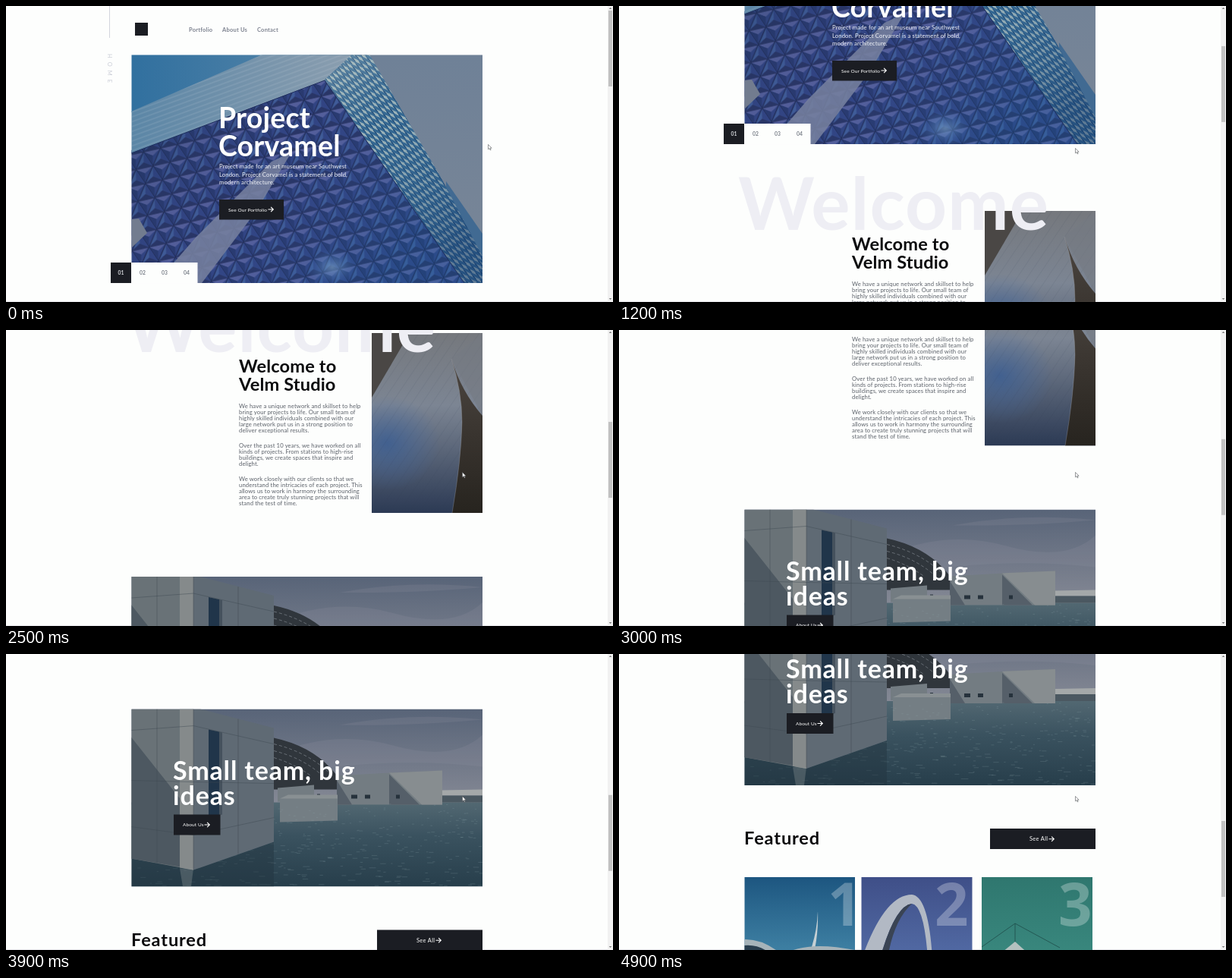
An HTML page for the animation above (5000 ms loop, 800x390 px).

```html
<!DOCTYPE html>
<html lang="en">
<head>
<meta charset="utf-8">
<title>Studio page</title>
<style>
html, body { margin: 0; width: 100%; height: 100%; overflow: hidden; background: #fdfefd; }
svg { display: block; width: 800px; height: 390px; }
text { font-family: Lato, sans-serif; }
.nav { font-weight: 700; font-size: 7.5px; letter-spacing: .22px; fill: #7d828f; }
.home { font-size: 7.5px; letter-spacing: 5px; fill: #c9ccd6; }
.hero { font-weight: 700; font-size: 37.5px; letter-spacing: .2px; fill: #fff; }
.lead, .copy { font-size: 7.7px; letter-spacing: .12px; fill: #f4f6fa; }
.copy { fill: #5b6069; }
.tab { font-weight: 700; font-size: 6.8px; text-anchor: middle; fill: #7b808a; }
.on { fill: #d5d7db; }
.btn { font-size: 6.5px; letter-spacing: .1px; fill: #fff; }
.wide { font-size: 7.5px; letter-spacing: .3px; }
.big { font-weight: 700; font-size: 96px; letter-spacing: 1.1px; fill: #eeeef4; }
.h2 { font-weight: 700; font-size: 23.6px; letter-spacing: .15px; fill: #0b0b0d; }
.feat { letter-spacing: .85px; }
.team { font-weight: 700; font-size: 34px; letter-spacing: .85px; fill: #fff; }
.num { font: 700 78px "Open Sans", sans-serif; fill: #fff; opacity: .28; }
.dark { fill: #1b1d23; }
.arrow { fill: none; stroke: #fff; stroke-width: 1.1; }
</style>
</head>
<body>
<svg viewBox="0 0 800 390">
<defs>
  <linearGradient id="skyL" x2="1"><stop stop-color="#31709f"/><stop offset="1" stop-color="#5a88aa"/></linearGradient>
  <linearGradient id="skyR" x2="0" y2="1"><stop stop-color="#6f8197"/><stop offset="1" stop-color="#798697"/></linearGradient>
  <linearGradient id="roof" x2="1"><stop stop-color="#5b86a6"/><stop offset="1" stop-color="#8b9eaf"/></linearGradient>
  <linearGradient id="shade" x2="1" y2=".5"><stop stop-color="#16304f" stop-opacity=".35"/><stop offset=".5" stop-color="#5a5a9a" stop-opacity=".12"/><stop offset="1" stop-color="#2a62a0" stop-opacity=".3"/></linearGradient>
  <linearGradient id="fall" x2=".5" y2="1"><stop stop-color="#d5dcd4" stop-opacity=".35"/><stop offset=".4" stop-color="#4f80a5" stop-opacity=".08"/><stop offset="1" stop-color="#1c3f70" stop-opacity=".5"/></linearGradient>
  <radialGradient id="glow"><stop stop-color="#7fa6cc" stop-opacity=".6"/><stop offset="1" stop-color="#3a6db5" stop-opacity="0"/></radialGradient>
  <radialGradient id="blue"><stop stop-color="#3a5e94" stop-opacity=".8"/><stop offset="1" stop-color="#4569a0" stop-opacity="0"/></radialGradient>
  <linearGradient id="steel" x2="0" y2="1"><stop stop-color="#75787d"/><stop offset=".4" stop-color="#7c8593"/><stop offset="1" stop-color="#2c3a54"/></linearGradient>
  <linearGradient id="fin" x2="0" y2="1"><stop stop-color="#4c4641"/><stop offset=".5" stop-color="#39342f"/><stop offset="1" stop-color="#27241f"/></linearGradient>
  <linearGradient id="dusk" x2="0" y2="1"><stop stop-color="#586478"/><stop offset="1" stop-color="#858995"/></linearGradient>
  <linearGradient id="water" x2="0" y2="1"><stop stop-color="#526872"/><stop offset=".4" stop-color="#3a525f"/><stop offset="1" stop-color="#273e4b"/></linearGradient>
  <linearGradient id="c1" x2="0" y2="1"><stop stop-color="#1d5680"/><stop offset="1" stop-color="#4386a8"/></linearGradient>
  <linearGradient id="c2" x2="0" y2="1"><stop stop-color="#3f4f88"/><stop offset="1" stop-color="#536ca6"/></linearGradient>
  <linearGradient id="c3" x2="0" y2="1"><stop stop-color="#2f776f"/><stop offset="1" stop-color="#3a897f"/></linearGradient>
  <pattern id="tiles" width="20" height="20" patternUnits="userSpaceOnUse" patternTransform="matrix(1.12 -.25 .62 .92 0 0)">
    <path fill="#2c4180" d="M0 0H20V20H0Z"/>
    <path fill="#535f9b" d="M0 0H20L7 7Z"/>
    <path fill="#22356a" d="M0 0V20L7 7Z"/>
    <path fill="#3c5c98" d="M20 0L0 20 13 13Z"/>
    <path fill="#22305f" d="M20 20H0L13 13Z"/>
    <path stroke="#17234a" fill="none" d="M0 0H20L0 20Z"/>
  </pattern>
  <pattern id="slats" width="14" height="12" patternUnits="userSpaceOnUse" patternTransform="matrix(.8 .5 .55 .85 0 0)">
    <path fill="#316590" d="M0 0H14V12H0Z"/>
    <path fill="#9fb5b9" d="M0 2L9 0V6L0 8Z"/>
    <path fill="#234d78" d="M9 0L14 4V10L9 6Z"/>
  </pattern>
  <pattern id="seams" width="60" height="11" patternUnits="userSpaceOnUse" patternTransform="rotate(-56)">
    <path stroke="#2e3746" stroke-opacity=".3" stroke-width=".6" fill="none" d="M0 0H60"/>
  </pattern>
  <pattern id="lines" width="40" height="6" patternUnits="userSpaceOnUse" patternTransform="rotate(-20)">
    <path stroke="#cfdae2" stroke-opacity=".15" stroke-width="1.4" d="M0 2H40"/>
  </pattern>
  <clipPath id="heroBox"><path d="M165.5 64.4H628V365H165.5Z"/></clipPath>
  <clipPath id="steelBox"><path d="M482 453H628V690H482Z"/></clipPath>
  <clipPath id="teamBox"><path d="M165.5 774H628V1008H165.5Z"/></clipPath>
  <clipPath id="cards"><path d="M165.5 1129H311V1320H165.5ZM319.5 1129H465.5V1320H319.5ZM478 1129H624V1320H478Z"/></clipPath>
</defs>

<path fill="#e5e5e9" d="M0 389H793V390H0Z"/>

<g id="page">
  <path fill="#d3d5dd" d="M136 0H137V42H136Z"/>
  <path class="dark" d="M170 22H187V39H170Z"/>

  <g clip-path="url(#heroBox)">
    <path fill="url(#skyR)" d="M400 64H628V365H400Z"/>
    <path fill="url(#skyL)" d="M165 64H460V140H165Z"/>
    <path fill="#416a92" d="M580 231L628 300V365H580Z"/>
    <path fill="url(#tiles)" d="M165 190L420 97 604 365H165Z"/>
    <path fill="url(#shade)" d="M165 190L420 97 604 365H165Z"/>
    <path fill="url(#roof)" d="M165 139L338 64H456L420 98 165 194Z"/>
    <path fill="url(#lines)" d="M165 139L338 64H456L420 98 165 194Z"/>
    <path fill="#76809f" fill-opacity=".88" d="M376 193L350 205 250 305 198 365H258L330 270Z"/>
    <path fill="#727c8f" d="M165 281L175 280 186 299 165 319Z"/>
    <path fill="url(#slats)" d="M420 97L456 64H479L576 231 628 330V365H604Z"/>
    <path fill="url(#fall)" d="M420 97L456 64H479L576 231 628 330V365H604Z"/>
    <ellipse fill="url(#glow)" cx="430" cy="344" rx="34" ry="24"/>
    <path stroke="#1c2c5c" fill="none" d="M165 194L420 98 604 365"/>
  </g>
  <path class="dark" d="M281 255H366V281.5H281ZM138 338H165V365H138Z"/>
  <path fill="#fdfefd" d="M165 338H252.5V365.5H165Z"/>

  <g clip-path="url(#steelBox)">
    <path fill="url(#steel)" d="M482 453H628V690H482Z"/>
    <ellipse fill="url(#blue)" cx="502" cy="598" rx="70" ry="62"/>
    <path fill="url(#seams)" d="M482 453H628V690H482Z"/>
    <path fill="#4a4745" d="M482 453H532L482 538Z"/>
    <path fill="#767b82" fill-opacity=".6" d="M587 487L628 453V562Z"/>
    <path fill="url(#fin)" d="M587 487Q600 530 628 562V690H588Q600 620 601 570 601 530 587 487Z"/>
    <path stroke="#b2b4b8" stroke-opacity=".4" stroke-width=".7" fill="none" d="M587 487Q601 530 601 570 600 620 588 690"/>
  </g>

  <g clip-path="url(#teamBox)">
    <path fill="url(#dusk)" d="M165 774H628V900H165Z"/>
    <path fill="#9093a0" fill-opacity=".2" d="M350 835Q430 800 510 822T628 808V850Q500 835 350 862ZM440 795Q530 778 628 788 540 796 440 795Z"/>
    <path fill="url(#water)" d="M165 897H628V1008H165Z"/>
    <path fill="#30363c" d="M353 812Q400 822 428 852L440 866V880H353Z"/>
    <path stroke="#777d84" stroke-width=".8" stroke-dasharray="4 3" fill="none" d="M353 820Q395 830 424 856M353 829Q390 838 415 860M353 838Q380 846 402 862"/>
    <path fill="#737c82" d="M436 862L505 858 575 855V900H436ZM358 878L406 874V896H358Z"/>
    <path fill="#878d90" d="M505 858L575 855V900H548Z"/>
    <path fill="#555f69" d="M505 860L545 900H505ZM436 868L456 900H436Z"/>
    <path fill="#a4a8a9" d="M575 881L628 880V888H575Z"/>
    <path fill="#4b5861" d="M575 888H628V897H575Z"/>
    <path fill="#26323c" d="M455 887H463V892H455ZM473 887H480V892H473ZM514 887H519V892H514ZM410 886H414V892H410Z"/>
    <path fill="#747e84" d="M361 892L437 890V921L361 923Z"/>
    <path fill="#899093" d="M361 892L372 887H437V892Z"/>
    <path id="ripples" stroke="#91a7ad" stroke-opacity=".3" stroke-width=".7"/>
    <path fill="#22343f" fill-opacity=".45" d="M165 970L247 986 353 949V1008H165Z"/>
    <path fill="#697277" d="M165 774H247V986L165 971Z"/>
    <path fill="#4d5861" d="M165 811L230 893V982L165 971Z"/>
    <path fill="#858a8b" d="M229 774H247V986L229 983Z"/>
    <path fill="#5f6a74" d="M247 774H256L353 799V949L247 986Z"/>
    <path fill="#20354a" d="M267 801L281 804V914L267 917Z"/>
    <path fill="#45515d" d="M281 804L285 805V913L281 914Z"/>
    <path stroke="#3e4951" stroke-opacity=".65" stroke-width=".7" fill="none" d="M165 802L247 796 353 820M165 868L247 870 353 872M165 929L247 940 353 917M199 774V977M306 787V965M247 774V986"/>
    <path fill="#8c9496" fill-opacity=".35" d="M229 984H247L244 1008H233Z"/>
  </g>
  <path class="dark" d="M221 913H282.5V940H221ZM489 1065H628V1092H489Z"/>

  <g clip-path="url(#cards)">
    <path fill="url(#c1)" d="M165 1129H311V1240H165Z"/>
    <path fill="url(#c2)" d="M319 1129H466V1240H319Z"/>
    <path fill="url(#c3)" d="M478 1129H624V1240H478Z"/>
    <path fill="#c5d0d4" d="M262 1174Q263 1206 256 1232H250Q261 1204 262 1174Z"/>
    <path fill="#a6b3b9" d="M165 1211Q190 1210 216 1232H165ZM216 1232Q245 1212 311 1225V1240H216Z"/>
    <path fill="#283d4d" d="M165 1219Q186 1217 202 1232H165Z"/>
    <path fill="#b2b9c4" d="M320 1236Q350 1152 386 1152 408 1154 413 1236H407Q402 1166 386 1164 364 1166 344 1236Z"/>
    <path fill="#3a4454" d="M344 1236Q364 1166 386 1164 362 1186 354 1236Z"/>
    <path stroke="#1f4d4b" stroke-width=".8" fill="none" d="M478 1221L522 1190 581 1222M522 1190V1216"/>
    <path fill="#b4c1bf" d="M500 1232L522 1214 542 1232Z"/>
  </g>
</g>

<path fill="#f1f1f1" d="M793 0H800V390H793Z"/>
<path fill="#777" d="M794.7 4H798.3L796.5 2ZM794.7 385H798.3L796.5 387Z"/>
<path id="thumb" fill="#c1c1c1" d="M794 6H799V106H794Z"/>
<path id="cursor" fill="#fff" stroke="#55585c" stroke-width=".6" d="M0 0V6.4L1.6 5 2.7 7.4 3.6 7 2.6 4.7H4.6Z"/>
</svg>

<script>
const $ = id => document.getElementById(id);
const NS = 'http://www.w3.org/2000/svg';

function add(tag, attrs, content = '') {
  const node = document.createElementNS(NS, tag);
  for (const key in attrs) node.setAttribute(key, attrs[key]);
  node.textContent = content;
  return $('page').appendChild(node);
}

// Lines are separated by "|"
function say(style, x, y, content, step = 0) {
  content.split('|').forEach((line, i) => add('text', { class: style, x, y: y + i * step }, line));
}

function arrow(x, y) {
  add('path', { class: 'arrow', d: `M${x} ${y}h6.8m-3.2 -3.1l3.2 3.1l-3.2 3.1` });
}

say('nav', 241, 33.5, 'Portfolio');
say('nav', 285, 33.5, 'About Us');
say('nav', 331, 33.5, 'Contact');
add('text', { class: 'home', transform: 'translate(133.7 63) rotate(90)' }, 'HOME');

say('hero', 280, 160.5, 'Project|Corvamel', 37.5);
say('lead', 281, 214.3, 'Project made for an art museum near Southwest|London. Project Corvamel is a statement of bold,|modern architecture.', 10.4);
say('btn', 293, 270.5, 'See Our Portfolio');
arrow(345.5, 268);
say('tab on', 151.5, 353.5, '01');
['02', '03', '04'].forEach((label, i) => say('tab', 180 + 29 * i, 353.5, label));

say('big', 157, 478, 'Welcome');
say('h2', 307, 505, 'Welcome to|Velm Studio', 23.5);
say('copy', 307, 552, 'We have a unique network and skillset to help|bring your projects to life. Our small team of|highly skilled individuals combined with our|large network put us in a strong position to|deliver exceptional results.', 8);
say('copy', 307, 604, 'Over the past 10 years, we have worked on all|kinds of projects. From stations to high-rise|buildings, we create spaces that inspire and|delight.', 8);
say('copy', 307, 648, 'We work closely with our clients so that we|understand the intricacies of each project. This|allows us to work in harmony the surrounding|area to create truly stunning projects that will|stand the test of time.', 8);

say('team', 220, 867, 'Small team, big|ideas', 33);
say('btn', 233, 928.7, 'About Us');
arrow(261.5, 926.5);

say('h2 feat', 165, 1086, 'Featured');
say('btn wide', 541, 1081.3, 'See All');
arrow(566.5, 1078.7);
[275, 416, 579].forEach((x, i) => say('num', x, 1193, String(i + 1)));

// Ripples widen towards the viewer
const rand = n => Math.abs(Math.sin(n * 127.1) * 43758.5) % 1;
let ripples = '';
for (let i = 0; i < 420; i++) {
  const depth = rand(i + 1);
  const x = 170 + 455 * rand(i + 500);
  ripples += `M${x} ${899 + 108 * depth}h${2 + 9 * depth * rand(i + 900)}`;
}
$('ripples').setAttribute('d', ripples);

const scrollKeys = [[0, 0], [200, 2], [1200, 183], [1700, 302], [2500, 449], [3500, 626], [4200, 758], [4700, 833], [4800, 835], [5000, 835]];

function scrollAt(t) {
  const i = scrollKeys.findIndex(key => key[0] > t);
  const [t0, y0] = scrollKeys[i - 1], [t1, y1] = scrollKeys[i];
  return y0 + (y1 - y0) * (t - t0) / (t1 - t0);
}

function draw(now) {
  const t = Math.floor((now + 5) / 100) * 100 % 5000;
  const y = scrollAt(t);
  const p = Math.min(1, t / 500);
  const ease = p * p * (3 - 2 * p);
  $('page').setAttribute('transform', `translate(0 ${-y})`);
  $('thumb').setAttribute('transform', `translate(0 ${y * .2563})`);
  $('cursor').setAttribute('transform', `translate(${635.5 - 34 * ease} ${182.5 + 5 * ease})`);
  requestAnimationFrame(draw);
}
requestAnimationFrame(draw);
</script>
</body>
</html>
```
